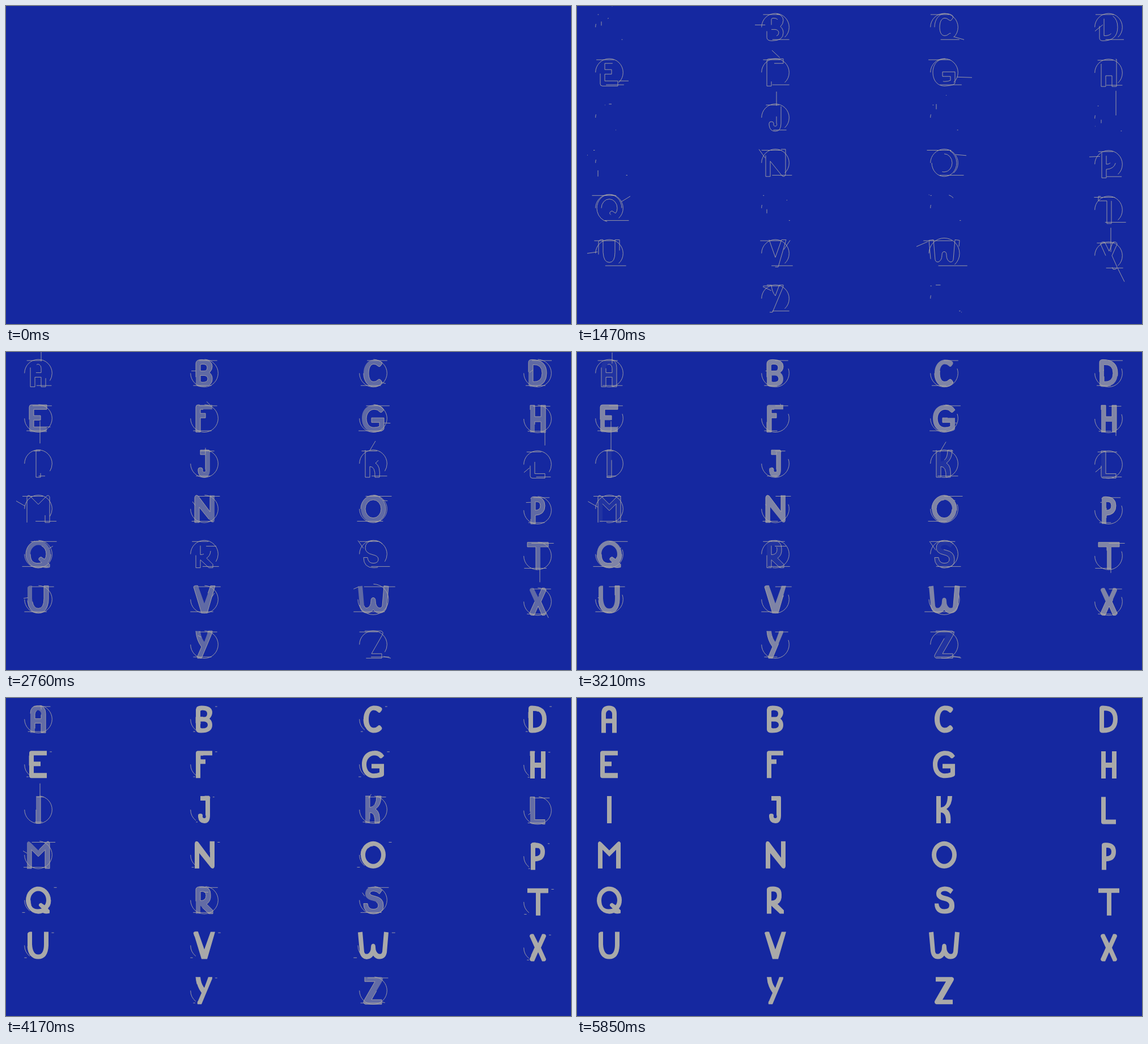
Recreate the animation shown at these times as an HTML page. Size 997x561 px, loop 5.88 s.

```html
<!DOCTYPE html>
<html lang="en">
<head>
<meta charset="utf-8">
<title>Alphabet construction</title>
<style>
  html, body { margin: 0; width: 100%; height: 100%; overflow: hidden; background: #1528a0; }
  svg { display: block; width: 100vw; height: 100vh; }
  .line { fill: none; stroke: #b0aca4; stroke-width: .85; }
  .body { fill: #a9a9a9; fill-rule: evenodd; }
</style>
</head>
<body>
<svg id="stage" viewBox="0 0 997 561"></svg>
<script>
const LOOP = 5880, STEP = 30;
const DRAW = 2170, POINTER_DRAW = 1700, FILL_START = 1650;
const LATE = 'AIKLMRSZ', LATE_DELAY = 1380;
const COLUMNS = [57, 350, 648, 938];

// Each letter, centred on its cell: pointer line, outline, then any counters.
const LETTERS = {
  A: ['M5-38V-17', 'M-14-10V24H-6V7H5V24H13V-10Q13-24-.5-24T-14-10Z', 'M-3-15Q-.5-17 2-15Q5-13 5-9V-1H-6V-9Q-6-13-3-15Z'],
  B: ['M-36-4H-15', 'M-15 7V18Q-15 24-6 24Q14 24 14 10Q14 3 9-1Q14-6 14-12Q14-24-5-24Q-15-24-15-17Z',
      'M-7-4V-14Q-7-16-3-16Q5-16 5-10Q5-4 0-4Z', 'M-7 4H0Q6 5 6 10Q6 16-3 16Q-7 16-7 14Z'],
  C: ['M35 22L14 16', 'M-17 0C-17-14-9-24 2-24Q11-24 15-20Q17-17 13-13Q11-10 8-13Q5-16 1-16C-5-16-8-9-8 0S-5 15 1 15Q5 15 8 12Q11 9 14 13Q17 16 14 19Q9 24 1 24C-9 24-17 14-17 0Z'],
  D: ['M-24 7L-8-6', 'M-16-2V19Q-16 24-10 24Q16 24 16 0T-10-24Q-16-24-16-19Z', 'M-8-15V15Q8 16 8 0T-8-15Z'],
  E: ['M34 15H14', 'M-16 2V20Q-16 24-12 24H15V15H-8V3H4V-5H-8V-16H15V-24H-12Q-16-24-16-20Z'],
  F: ['M-6-39L10-24', 'M-2-16H14V-24H-11Q-15-24-15-20V24H-7V-1H2V-9H-7V-16Z'],
  G: ['M49 9L19 8', 'M2-24C-12-24-20-14-20 0S-12 24 1 24Q19 23 19 18V-1H-3V7H11V14Q7 16 1 16C-7 16-12 9-12 0S-6-16 2-16Q8-16 11-12Q14-9 17-13L19-15Q14-24 2-24Z'],
  H: ['M13 75V23', 'M-13-16V24H-5V5H6V24H14V-24H6V-4H-5V-24H-13Z'],
  I: ['M3-75V-24', 'M4-24H-4V24H4Z'],
  J: ['M2-46V-17', 'M10-20V10Q10 24 0 24T-11 13V10Q-11 7-7 7T-3 10Q-4 15 0 15T2 9V-16H-7V-24H8Q10-24 10-20Z'],
  K: ['M4-40L-8-20', 'M-14-24V24H-6V5Q4 5 3 24H11Q13 4 4-1Q14-8 14-24H6Q6-5-6-4V-24Z'],
  L: ['M-24 14L-12 4', 'M-13 2V20Q-13 24-9 24H13V16H-5V-24H-13Z'],
  M: ['M-39-14L-20-3', 'M-20 24V-21Q-18-26-14-22L0-8 14-22Q18-26 20-21V24H12V-9L0 3-12-9V24Z'],
  N: ['M-29-24L-16-6', 'M10-24H18V20Q17 26 12 23L-9-3V24H-17V-20Q-16-26-11-23L10 5Z'],
  O: ['M39-13L17-15', 'M-22 0A22 24 0 0 0 22 0A22 24 0 0 0-22 0Z', 'M0-16A14 16 0 0 1 0 16A14 16 0 0 1 0-16Z'],
  P: ['M-34-13L-12-14', 'M-12-20V24H-4V9Q13 8 13-8T-5-24Q-12-24-12-20Z', 'M-4-15V0Q5 0 5-8T-4-15Z'],
  Q: ['M37-21L19-10', 'M22 0A22 24 0 1 0 8 22.4Q12 25 20 23V18L17 15Q22 9 22 0Z', 'M-14 0A14 16 0 0 1 14 0Q14 6 11 9L5 5Q0 6 1 10L6 15Q-14 20-14 0Z'],
  R: ['M21-14H-1', 'M-15 2V24H-7V10L8 24H15V18L4 7Q12 2 11-10Q11-24-4-24Q-15-24-15-19Z', 'M-7-15V1Q3 1 3-8T-7-15Z'],
  S: ['M-27-24L-15-7', 'M16-18Q11-24 1-24Q-14-23-14-11Q-14-2-1 1Q9 3 9 9Q9 16 0 16Q-9 16-10 6H-17Q-17 24 1 24T18 9Q18-4 3-7Q-6-9-6-12Q-5-16 1-16Q6-16 11-11Z'],
  T: ['M4 74V23', 'M5-16V24H-3V-16H-18V-24H19V-16Z'],
  U: ['M-39 0L-18-3', 'M-19 2V-21Q-17-25-11-24V-2Q-10 16 0 16T10-2V-24H18V0Q17 24 0 24T-19 2Z'],
  V: ['M26-23L13-4', 'M-11-24L0 7 11-24H19L5 24H-5L-19-22Q-18-25-11-24Z'],
  W: ['M-49-12L-26-22', 'M-24 10L-27-23-19-24-16 11Q-15 16-10 15-4 12-4 3Q-4-3 0-3T4 3Q4 12 10 15Q15 16 16 11L19-24 27-23 24 12Q22 24 11 24Q4 24 0 18Q-4 24-11 24-22 24-24 10Z'],
  X: ['M28 46L14 18', 'M-5 0L-14-20Q-14-25-7-24L1-8 8-24Q15-25 15-20L6 0 15 20Q15 25 8 24L1 8-6 24Q-14 25-14 20Z'],
  Y: ['M-22-21L-5-13', 'M-15-24H-7Q-6-12 0-5L7-24H14Q14-20 13-19L-5 24H-12Q-13 20-11 18L-5 4Q-14-8-15-24Z'],
  Z: ['M31 24L15 20', 'M-15-24H14Q19-22 16-17L-3 16H15V24H-14Q-19 22-16 17L3-16H-15Z']
};

const stage = document.getElementById('stage');
const clamp = v => Math.min(1, Math.max(0, v));

function add(parent, tag, attrs) {
  const el = document.createElementNS('http://www.w3.org/2000/svg', tag);
  for (const key in attrs) el.setAttribute(key, attrs[key]);
  return parent.appendChild(el);
}

function addLine(group, d, options = {}) {
  const el = add(group, 'path', { class: 'line', d });
  const length = el.getTotalLength();
  el.setAttribute('pathLength', 1);
  return { el, length, duration: DRAW, lag: 0, reach: 1, ...options };
}

function buildLetter([name, [pointer, outline, ...counters]], index) {
  const column = index % 4 + (index > 23 ? 1 : 0);
  const row = Math.floor(index / 4);
  const y = 37.4 + row * (column === 3 ? 80.6 : 79.8);
  const group = add(stage, 'g', { transform: `translate(${COLUMNS[column]} ${y})` });
  const body = add(group, 'path', { class: 'body', d: outline + counters.join('') });
  const box = body.getBBox();
  const r = Math.max(24.3, box.width / 2);
  const guide = box.width * 1.25 + 8;
  const left = box.x - box.width / 8 - 3;

  const pointerLine = addLine(group, pointer, { duration: POINTER_DRAW });
  if (pointerLine.length > 40) pointerLine.lag = .18;
  const lines = [
    pointerLine,
    addLine(group, `M${-r} 0A${r} ${r} 0 0 1 ${r} 0A${r} ${r} 0 0 1 ${-r} 0`, { reach: .93 }),
    addLine(group, `M${left} -22.3h${guide}`),
    addLine(group, `M${left + 2 + guide} 21.8h${-guide}`),
    addLine(group, outline),
    ...counters.map(d => addLine(group, d, { lag: name === 'A' || name === 'Q' ? 0 : .3 }))
  ];
  return { body, lines, delay: LATE.includes(name) ? LATE_DELAY : 0 };
}

// A line grows from its start, then vanishes from its start.
function drawLine({ el, duration, lag, reach }, time) {
  const ease = v => clamp((v - lag) / (1 - lag));
  const grown = ease(time / duration);
  const gone = ease(time / duration - 1);
  const from = reach * gone;
  const to = Math.min(1, reach * (grown + gone));
  const visible = gone < 1 && to > from;
  el.setAttribute('visibility', visible ? 'visible' : 'hidden');
  if (visible) el.setAttribute('stroke-dasharray', `0 ${from} ${to - from} 2`);
}

const letters = Object.entries(LETTERS).map(buildLetter);

function render(time) {
  for (const { body, lines, delay } of letters) {
    const local = time - delay;
    body.setAttribute('fill-opacity', clamp((local - FILL_START) / DRAW));
    lines.forEach(line => drawLine(line, local));
  }
}

const start = performance.now();
function tick() {
  const elapsed = (performance.now() - start) % LOOP;
  render(Math.floor(elapsed / STEP) * STEP);
  requestAnimationFrame(tick);
}
render(0);
requestAnimationFrame(tick);
</script>
</body>
</html>
```
